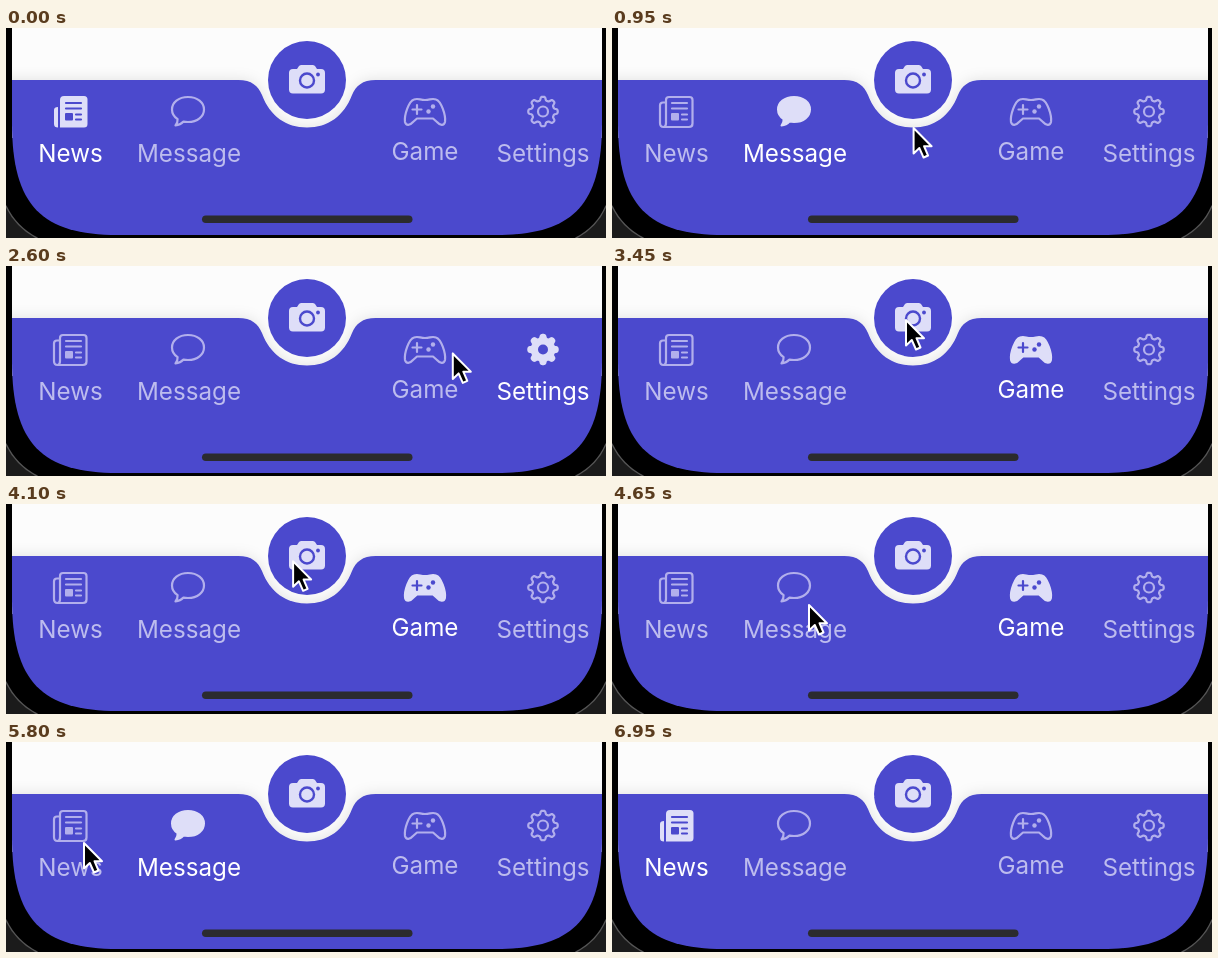
Write an HTML page that moves like this. It is 600 px wide and 210 px high and loops after 7 s.

```html
<!DOCTYPE html>
<html lang="en">
<head>
<meta charset="utf-8">
<style>
  html, body { margin: 0; width: 100%; height: 100%; overflow: hidden; background: #000; }
  svg { display: block; width: 600px; height: 210px; }
  text { font: 400 24.2px Inter, Roboto, sans-serif; text-anchor: middle; fill: #bdbcee; }
  g, use, path, circle { stroke-linecap: round; stroke-linejoin: round; }
  .line { fill: none; color: #b2afec; stroke: currentColor; stroke-width: 2.2; }
  .solid { fill: #dedef8; stroke: #dedef8; stroke-width: 2; display: none; }
  .cut { fill: none; color: #4b49cd; stroke: currentColor; stroke-width: 2.2; }
  .on text { fill: #fff; }
  .on .line { display: none; }
  .on .solid { display: inline; }
</style>
</head>
<body>
<svg viewBox="0 0 600 210">
  <defs>
    <clipPath id="screen">
      <path d="M6 0H596V95C596 178 566 207 490 207H112C36 207 6 178 6 95Z"/>
    </clipPath>
    <filter id="shade" x="-5%" y="-20%" width="110%" height="140%">
      <feDropShadow dx="0" dy="0" stdDeviation="7" flood-color="#000" flood-opacity=".11"/>
    </filter>
    <path id="gear"/>
    <path id="bubble" d="M182 69C191.500 69 198 74.500 198 81.500C198 88.500 191.500 94 182 94C180.500 94 179 93.900 177.500 93.600C175.500 95.800 173 97.200 169.500 97.500C171 95.500 171.800 93.500 171.600 91.200C168 88.800 166 85.500 166 81.500C166 74.500 172.500 69 182 69Z"/>
    <path id="pad" d="M408 71.500C412 70 414 72 419 72C424 72 426 70 430 71.500C435 73 440 87 439 94C438 98 434 97.500 431 94L427 90.500H411L407 94C404 97.500 400 98 399 94C398 87 403 73 408 71.500Z"/>
    <g id="controls">
      <path d="M411 77V86M406.500 81.500H415.500"/>
      <g fill="currentColor" stroke="none">
        <circle cx="427" cy="78.500" r="2.200"/>
        <circle cx="422.500" cy="83.500" r="2.200"/>
      </g>
    </g>
    <g id="columns">
      <path d="M60 75H75M60 80.500H75M70 86.500H75M70 91.500H75"/>
      <rect x="59" y="85" width="8" height="7.500" rx="1" fill="currentColor" stroke="none"/>
    </g>
  </defs>

  <g fill="none">
    <path d="M0 178Q10 199 31 210H0ZM600 178Q591 199 570 210H600Z" fill="#1b1b1b"/>
    <path d="M0 178Q10 199 31 210M600 178Q591 199 570 210" stroke="#555" stroke-width="1.500"/>
  </g>

  <g clip-path="url(#screen)">
    <rect width="600" height="110" fill="#fcfcfc"/>
    <path filter="url(#shade)" fill="#4b49cd" d="M-20 52H232C246 52 252 58 256 67C264 88 280 99.500 301 99.500C322 99.500 338 88 346 67C350 58 356 52 370 52H620V230H-20Z"/>
    <circle cx="301" cy="52" r="39" fill="#4b49cd"/>
  </g>

  <g fill="#dedef8">
    <path d="M287 41H291L293 38Q294 37 295.500 37H306.500Q308 37 309 38L311 41H315Q319 41 319 45V61.500Q319 65.500 315 65.500H287Q283 65.500 283 61.500V45Q283 41 287 41Z"/>
    <circle cx="301" cy="52.500" r="7" stroke="#4b49cd" stroke-width="2.400"/>
    <circle cx="312" cy="46.500" r="1.900" fill="#4b49cd"/>
  </g>

  <g id="news">
    <g class="line">
      <path d="M54 74.500H51Q48 74.500 48 77.500V95Q48 99 51.500 99H77Q80.500 99 80.500 95.500V72Q80.500 69 77.500 69H57Q54 69 54 72V95Q54 99 51.500 99"/>
      <use href="#columns"/>
    </g>
    <g class="solid">
      <path stroke="none" d="M58 68H78Q81.500 68 81.500 71.500V96Q81.500 99.500 78 99.500H54V72Q54 68 58 68ZM52 79V99.500Q48 99.500 48 96V82Q48 79 52 79Z"/>
      <use href="#columns" class="cut"/>
    </g>
    <text x="64.500" y="134">News</text>
  </g>
  <g id="message">
    <use href="#bubble" class="line"/>
    <use href="#bubble" class="solid"/>
    <text x="183" y="134">Message</text>
  </g>
  <g id="game">
    <g class="line"><use href="#pad"/><use href="#controls"/></g>
    <g class="solid"><use href="#pad"/><use href="#controls" class="cut"/></g>
    <text x="419" y="132">Game</text>
  </g>
  <g id="settings">
    <g class="line"><use href="#gear"/><circle cx="537" cy="83.500" r="5"/></g>
    <g class="solid"><use href="#gear"/><circle cx="537" cy="83.500" r="5" fill="#4b49cd" stroke="none"/></g>
    <text x="537" y="134">Settings</text>
  </g>

  <rect x="196" y="187.400" width="210.500" height="7.600" rx="3.800" fill="#2b2b2e"/>
  <path id="cursor" d="M0 0V25.500L5.800 20L10 29.500L14.500 27.500L10.500 18.200H18Z" stroke="#fff" stroke-width="2"/>
</svg>
<script>
  const LOOP = 7000;
  const byId = id => document.getElementById(id);
  const tabs = ['news', 'message', 'game', 'settings'].map(byId);
  const cursor = byId('cursor');

  // [time, tab index]
  const taps = [[0, 0], [620, 1], [1350, 2], [2150, 3], [2850, 2], [4780, 1], [5920, 0]];

  // [time, x, y] of the pointer tip
  const stops = [
    [100, 160, 214], [580, 183, 93], [650, 183, 93], [1250, 419, 107], [1450, 419, 107],
    [2050, 523, 84], [2300, 523, 84], [2780, 412, 89], [2950, 412, 89], [3420, 294, 54],
    [4000, 294, 54], [4620, 197, 101], [5000, 197, 101], [5700, 78, 101], [6050, 78, 101],
    [6600, 110, -34]
  ];

  function gearPath(cx, cy) {
    const points = Array.from({ length: 160 }, (_, i) => {
      const a = i / 160 * 2 * Math.PI;
      const r = 13 + 1.8 * Math.tanh(2 * Math.cos(8 * a));
      return (cx + r * Math.cos(a)).toFixed(2) + ' ' + (cy + r * Math.sin(a)).toFixed(2);
    });
    return 'M' + points.join('L') + 'Z';
  }
  byId('gear').setAttribute('d', gearPath(537, 83.5));

  function pointerAt(time) {
    const next = stops.findIndex(stop => stop[0] > time);
    if (next < 1) return [0, -60];
    const [t0, x0, y0] = stops[next - 1], [t1, x1, y1] = stops[next];
    const u = (time - t0) / (t1 - t0), ease = u * u * (3 - 2 * u);
    return [x0 + (x1 - x0) * ease, y0 + (y1 - y0) * ease];
  }

  function draw(time) {
    const active = taps.filter(tap => tap[0] <= time).pop()[1];
    tabs.forEach((tab, i) => tab.classList.toggle('on', i === active));
    cursor.setAttribute('transform', `translate(${pointerAt(time)})`);
  }

  const start = performance.now();
  function tick() {
    draw((performance.now() - start) % LOOP);
    requestAnimationFrame(tick);
  }
  tick();
</script>
</body>
</html>
```
